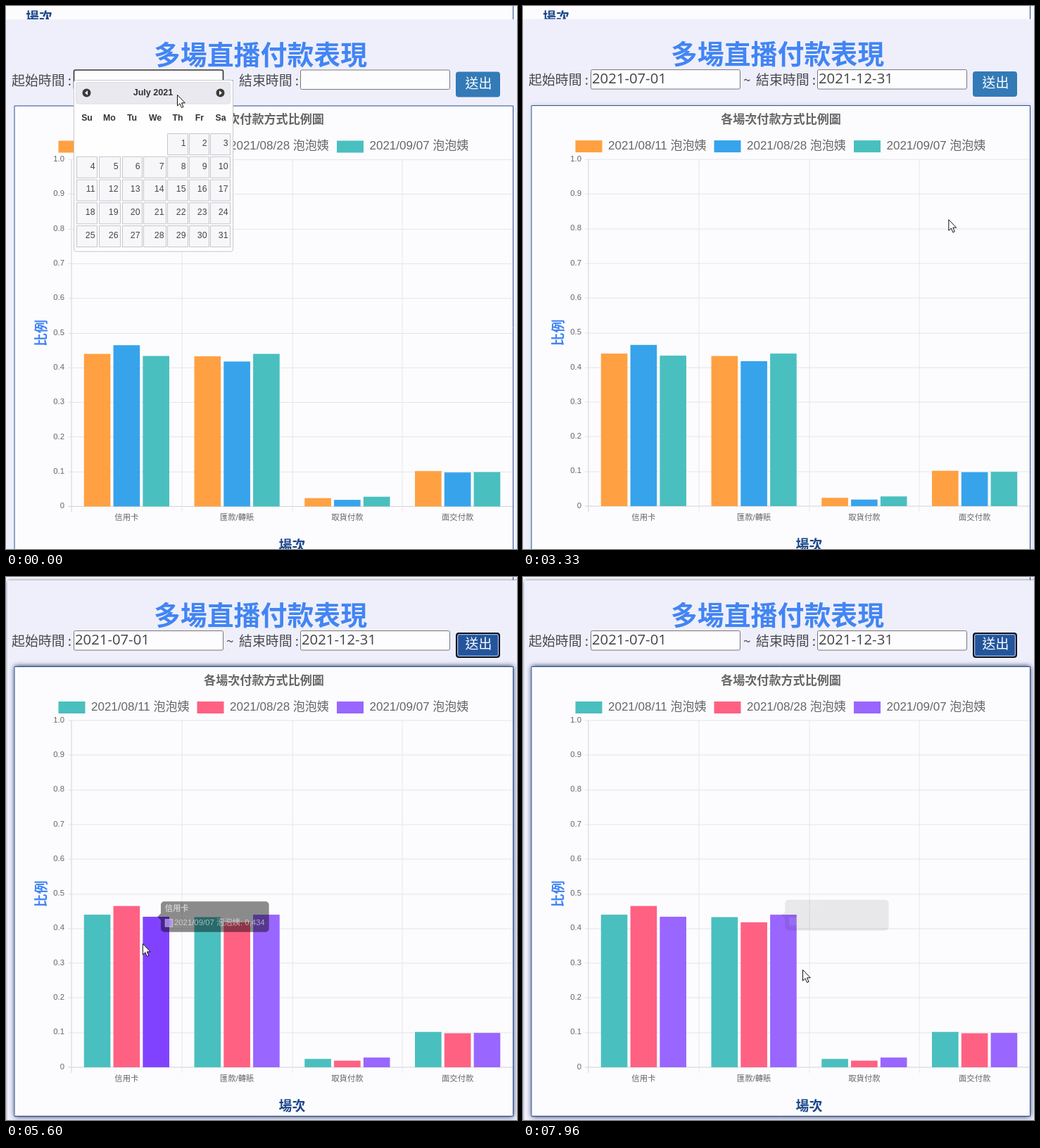
Recreate the animation shown at these times as an HTML page with a canvas. Size 726x772 px, loop 8 s.

```html
<!DOCTYPE html>
<html lang="zh-TW">
<head>
<meta charset="utf-8">
<style>
  html, body { margin: 0; width: 100%; height: 100%; overflow: hidden; background: #fcfcfe; }
  canvas { display: block; }
</style>
</head>
<body>
<canvas id="stage" width="726" height="772"></canvas>
<script>
const ctx = document.getElementById('stage').getContext('2d');
const LOOP = 8000;
const CJK = '"Noto Sans CJK TC", "Noto Sans CJK JP", sans-serif';
const ARIAL = '"Liberation Sans", ' + CJK;
const OPEN = '"Open Sans", ' + CJK;

const ORANGE = [30, 100, 63], BLUE = [204, 82, 57], TEAL = [180, 48, 52];
const RED = [347, 100, 69], PURPLE = [260, 100, 70];
const CATEGORIES = ['信用卡', '匯款/轉賬', '取貨付款', '面交付款'];
const SERIES = ['2021/08/11 泡泡姨', '2021/08/28 泡泡姨', '2021/09/07 泡泡姨'];
const VALUES = [[.44, .465, .434], [.433, .418, .44], [.024, .019, .028], [.102, .098, .099]];

// Plot area in the raised position of the card
const LEFT = 93, RIGHT = 720, TOP = 204, BASE = 697;
const CELL = (RIGHT - LEFT) / 4, SLOT = CELL * .8 / 3, BAR = SLOT * .9;
const DROP = 14.5, REDRAW = 4350;

// time, x, y, shape
const POINTER = [
  [0, 243, 126, 'arrow'], [200, 243, 126, 'arrow'], [450, 248, 194, 'hand'], [750, 248, 194, 'arrow'],
  [1090, 416, 109, 'arrow'], [1320, 490, 93, 'beam'], [1600, 500, 98, 'beam'], [1850, 565, 126, 'beam'],
  [2400, 580, 131, 'beam'], [2600, 580, 131, 'arrow'], [2950, 600, 322, 'hand'], [3300, 600, 322, 'arrow'],
  [3650, 649, 111, 'hand'], [4550, 649, 111, 'arrow'], [5000, 430, 310, 'arrow'], [5500, 215, 508, 'arrow'],
  [5600, 194, 521, 'arrow'], [6000, 147, 527, 'arrow'], [6900, 147, 527, 'arrow'], [7000, 153, 530, 'arrow'],
  [7150, 195, 540, 'arrow'], [7330, 268, 550, 'arrow'], [7470, 310, 554, 'arrow'], [7600, 352, 556, 'arrow'],
  [7785, 390, 557, 'arrow'], [7880, 397, 558, 'arrow'], [8000, 397, 558, 'arrow']
];

// time, then category and series of the bar under the pointer
const HOVERS = [
  [5526, 0, 2], [5640, 0, 1], [5950, 0, 0], [7000, 0, 1], [7150, 0, 2], [7280],
  [7330, 1, 0], [7470, 1, 1], [7600, 1, 2], [7785]
];

const clamp = v => Math.min(1, Math.max(0, v));
const mix = (a, b, k) => a + (b - a) * k;
const ramp = (t, a, b) => { const k = clamp((t - a) / (b - a)); return k * k * (3 - 2 * k); };
const outQuart = k => 1 - (1 - clamp(k)) ** 4;
const hsl = ([h, s, l]) => `hsl(${h} ${s}% ${l}%)`;
const darker = ([h, s, l]) => hsl([h, Math.min(100, s * 1.5), l * .9]);
const barX = (c, s) => LEFT + CELL * (c + .1) + SLOT * (s + .05);
const barY = v => BASE - (BASE - TOP) * v;

function text(str, x, y, font, color, align = 'left') {
  ctx.font = font;
  ctx.fillStyle = color;
  ctx.textAlign = align;
  ctx.textBaseline = 'middle';
  ctx.fillText(str, x, y);
}

function rect(x, y, w, h, color) {
  ctx.fillStyle = color;
  ctx.fillRect(x, y, w, h);
}

function box(x, y, w, h, r, fill, stroke, width = 1) {
  ctx.beginPath();
  ctx.roundRect(x, y, w, h, r);
  if (fill) { ctx.fillStyle = fill; ctx.fill(); }
  if (stroke) { ctx.strokeStyle = stroke; ctx.lineWidth = width; ctx.stroke(); }
}

function polygon(points, fill, stroke) {
  ctx.beginPath();
  points.forEach(([x, y]) => ctx.lineTo(x, y));
  ctx.closePath();
  ctx.fillStyle = fill;
  ctx.fill();
  if (stroke) { ctx.strokeStyle = stroke; ctx.lineWidth = 1; ctx.stroke(); }
}

function glow(amount, blur, draw) {
  ctx.save();
  ctx.shadowColor = `rgba(10, 25, 70, ${amount})`;
  ctx.shadowBlur = blur;
  draw();
  ctx.restore();
}

function drawInput(x, value, focused) {
  box(x + .5, 76.5, 212, 27.5, 2, '#fdfdff', focused ? '#333' : '#767680', focused ? 1.6 : 1);
  text(value, x + 2, 91, '20.3px ' + OPEN, '#444');
}

function drawForm(t) {
  const label = '18.9px ' + CJK;
  text('多場直播付款表現', 361.5, 54, 'bold 37.9px ' + CJK, '#4285f4', 'center');
  text('起始時間 :', 8, 91, label, '#484850');
  text('~', 313, 91, label, '#484850');
  text('結束時間 :', 331, 91, label, '#484850');
  drawInput(96, t >= 600 ? '2021-07-01' : '', t < 600);
  drawInput(418, t >= 3100 ? '2021-12-31' : '', t >= 1400 && t < 3100);

  const pressed = t >= 4150;
  const dark = pressed || t >= 3600;
  box(639, 79, 63, 36, 4, dark ? '#23559c' : '#337ab7');
  if (pressed) {
    box(640, 80, 61, 34, 4, null, '#0b1220', 2);
    box(641.7, 81.7, 57.6, 30.6, 2, null, '#dfe6f2', .9);
  }
  text('送出', 671.5, 95, label, '#fff', 'center');
}

function hoverIndex(t) {
  let i = HOVERS.length - 1;
  while (i >= 0 && HOVERS[i][0] > t) i--;
  return i;
}

// Position and opacity of the tooltip, each change easing from the state before it
function tipState(i, t) {
  if (i < 0) return { x: 0, y: 0, alpha: 0 };
  const [start, c, s] = HOVERS[i];
  const before = tipState(i - 1, start);
  const k = outQuart((t - start) / 400);
  if (c === undefined) return { ...before, alpha: before.alpha * (1 - k) };
  const x = barX(c, s) + BAR / 2, y = barY(VALUES[c][s]);
  const jump = before.alpha < .05;
  return { x: jump ? x : mix(before.x, x, k), y: jump ? y : mix(before.y, y, k), alpha: mix(before.alpha, 1, k) };
}

function drawTooltip(t, colors) {
  let i = hoverIndex(t);
  const { x, y, alpha } = tipState(i, t);
  if (alpha < .01) return;
  if (HOVERS[i].length < 2) i--;
  const [, c, s] = HOVERS[i];
  const body = `${SERIES[s]}: ${VALUES[c][s]}`;
  ctx.save();
  ctx.globalAlpha = alpha;
  ctx.font = '11.35px ' + ARIAL;
  const bx = x + 6.8, by = y - 21.8;
  const w = ctx.measureText(body).width + 25;
  const shade = 'rgba(0, 0, 0, .8)';
  box(bx, by, w, 43.6, 5, shade);
  polygon([[bx - 4.8, y], [bx, y - 4.8], [bx, y + 4.8]], shade);
  text(CATEGORIES[c], bx + 5.7, by + 11, 'bold 11.35px ' + ARIAL, '#fff');
  rect(bx + 5.7, by + 25, 11.4, 11.4, '#fff');
  rect(bx + 6.7, by + 26, 9.4, 9.4, hsl(colors[s]));
  text(body, bx + 19, by + 31, '11.35px ' + ARIAL, '#fff');
  ctx.restore();
}

function drawChart(t) {
  const fresh = t >= REDRAW;
  const colors = fresh ? [TEAL, RED, PURPLE] : [ORANGE, BLUE, TEAL];
  const grow = fresh ? outQuart((t - REDRAW) / 1000) : 1;
  const hovered = ramp(t, 800, 900) - ramp(t, 960, 1060) + ramp(t, 3300, 3420) - ramp(t, 3620, 3740) + ramp(t, 4620, 4820);
  glow(hovered, 7, () => rect(11.5, 127, 709.5, 640, '#fcfcfe'));
  box(12, 127.5, 708.5, 639, 0, '#fcfcfe', '#234d8c', 1);

  text('各場次付款方式比例圖', 366.5, 146, 'bold 17.1px ' + CJK, '#666', 'center');
  SERIES.forEach((name, s) => {
    const x = [74.5, 271.5, 470][s];
    rect(x, 177, 38, 17, hsl(colors[s]));
    text(name, x + 46.5, 185, '17px ' + ARIAL, '#666');
  });

  for (let i = 0; i <= 10; i++) {
    const y = barY(i / 10);
    rect(88, Math.round(y) - .5, RIGHT - 88, 1, i ? '#e5e5ea' : '#d2d2d8');
    text(i ? (i / 10).toFixed(1) : '0', 83, y - .5, '11.35px ' + ARIAL, '#666', 'right');
  }
  for (let i = 0; i < 4; i++) {
    rect(Math.round(LEFT + CELL * i) - .5, TOP, 1, BASE - TOP + 8, i ? '#e5e5ea' : '#d2d2d8');
  }

  const [, hotC, hotS] = HOVERS[hoverIndex(t)] || [];
  VALUES.forEach((row, c) => {
    row.forEach((v, s) => {
      const y = barY(v * grow);
      rect(barX(c, s), y, BAR, BASE - y, c === hotC && s === hotS ? darker(colors[s]) : hsl(colors[s]));
    });
    text(CATEGORIES[c], LEFT + CELL * (c + .5), 713.5, '11.35px ' + ARIAL, '#666', 'center');
  });

  text('場次', 406.5, 752, 'bold 18.9px ' + CJK, '#1c478a', 'center');
  ctx.save();
  ctx.translate(50, 450.5);
  ctx.rotate(-Math.PI / 2);
  text('比例', 0, 0, 'bold 18.9px ' + CJK, '#4285f4', 'center');
  ctx.restore();
  drawTooltip(t, colors);
}

function drawCalendar(x, title, firstDay, today, alpha) {
  if (alpha <= 0) return;
  const lefts = [4, 36, 69, 99, 133, 164, 194], rights = [33, 66, 97, 131, 162, 192, 222];
  const centers = [19, 51, 83, 116, 148, 179, 209];
  ctx.save();
  ctx.globalAlpha = alpha;
  box(x + .5, 105.5, 226, 243.5, 3, '#fefeff', '#c8c8cc');
  box(x + 3.5, 108.5, 219, 30.5, 3, '#e9e9ef', '#dcdce2');
  text(title, x + 113, 123.5, 'bold 12.6px ' + ARIAL, '#333', 'center');
  [[18.5, -1], [208.5, 1]].forEach(([dx, dir]) => {
    const cx = x + dx, cy = 123.5;
    box(cx - 6, cy - 6, 12, 12, 6, '#3c3c3c');
    polygon([[cx + dir * 2.5, cy], [cx - dir * 1.5, cy - 3.2], [cx - dir * 1.5, cy + 3.2]], '#fff');
  });
  ['Su', 'Mo', 'Tu', 'We', 'Th', 'Fr', 'Sa'].forEach((day, i) =>
    text(day, x + centers[i], 159.5, 'bold 12.3px ' + ARIAL, '#333', 'center'));
  for (let day = 1; day <= 31; day++) {
    const slot = day + firstDay - 1, col = slot % 7;
    const y = 181.5 + 32.75 * Math.floor(slot / 7);
    const now = day === today;
    box(x + lefts[col] + .5, y, rights[col] - lefts[col], 30, 0, now ? '#fffa78' : '#f7f7fa', now ? '#dad55e' : '#c5c5cc');
    text(day, x + rights[col] - 2.5, y + 14, '12.3px ' + ARIAL, now ? '#777620' : '#454545', 'right');
  }
  ctx.restore();
}

function drawPointer(t) {
  let i = POINTER.length - 2;
  while (POINTER[i][0] > t) i--;
  const [t0, x0, y0, shape] = POINTER[i], [t1, x1, y1] = POINTER[i + 1];
  const k = (t - t0) / (t1 - t0);
  ctx.save();
  ctx.translate(mix(x0, x1, k), mix(y0, y1, k));
  if (shape === 'arrow') {
    polygon([[.5, .5], [.5, 16], [4, 12.7], [6.5, 18.5], [9, 17.4], [6.5, 11.8], [11.3, 11.8]], '#fff', '#111');
  } else if (shape === 'beam') {
    rect(-.7, -7, 1.4, 15, '#222');
    rect(-3, -8, 6, 1.2, '#222');
    rect(-3, 7.5, 6, 1.2, '#222');
  } else {
    polygon([[-1.5, 0], [1.5, 0], [2, 6], [5, 6.5], [8, 8], [9, 10], [8.5, 15], [6.5, 20], [-1.5, 20],
      [-4, 16], [-7, 12], [-6, 10.5], [-4, 11], [-1.8, 13.5]], '#fff', '#111');
    [2, 5].forEach(x => rect(x, 8, .9, 4, '#333'));
  }
  ctx.restore();
}

function draw(t) {
  const lift = ramp(t, 750, 1050) - ramp(t, 1650, 1950) + ramp(t, 3300, 3600);
  rect(0, 0, 726, 772, '#fcfcfe');
  text('場次', 28, 15.5, 'bold 18.9px ' + CJK, '#1c478a');
  rect(720, 0, 1, 20, '#234d8c');

  ctx.save();
  ctx.translate(0, DROP * (1 - lift));
  glow(lift * .95, 5, () => rect(1.5 * lift, 4.5, 740, 800, '#efeffb'));
  drawForm(t);
  drawChart(t);
  ctx.restore();

  drawCalendar(96, 'July 2021', 4, 0, 1 - ramp(t, 600, 780));
  drawCalendar(418.5, 'December 2021', 3, 12, ramp(t, 1420, 1620) - ramp(t, 3100, 3300));
  drawPointer(t);
}

function frame() {
  draw(performance.now() % LOOP);
  requestAnimationFrame(frame);
}
frame();
</script>
</body>
</html>
```
